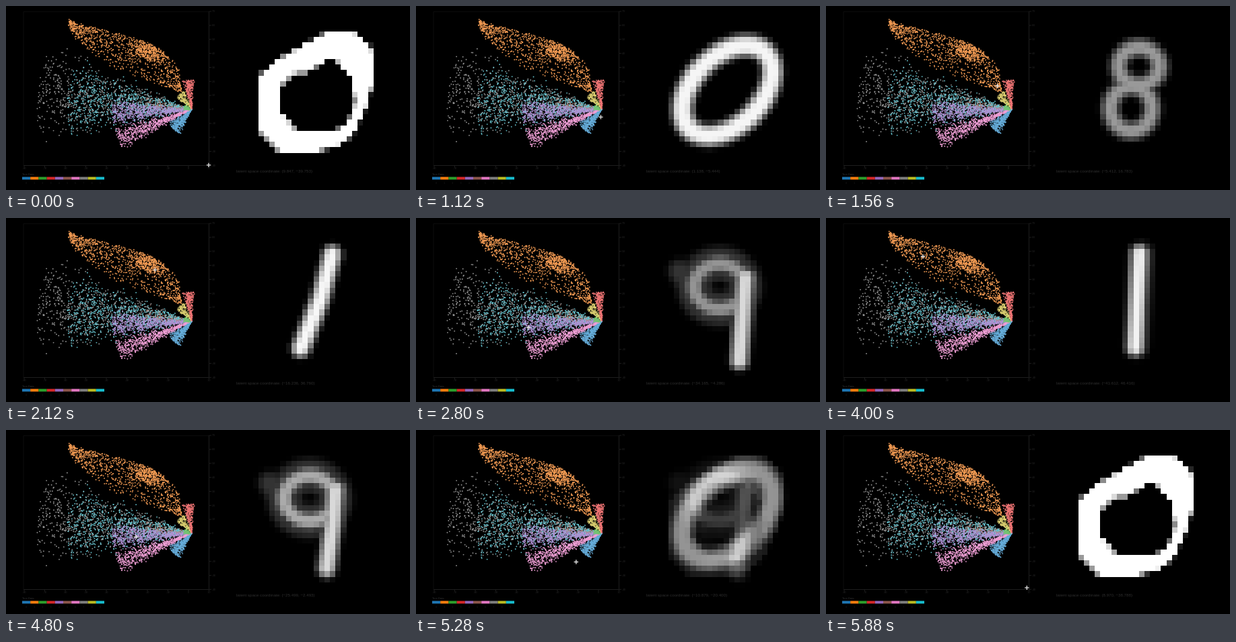
These frames come from a looping animation (600 by 274 pixels, 5920 ms). An HTML page with a canvas:

```html
<!DOCTYPE html>
<html lang="en">
<head>
<meta charset="utf-8">
<title>Latent space explorer</title>
<style>
  html, body { margin: 0; width: 100%; height: 100%; overflow: hidden; background: #000; }
  #stage { position: relative; width: 600px; height: 274px; overflow: hidden; background: #000; }
  #stage > * { position: absolute; left: 0; top: 0; }
  #stage > #digit { left: 342px; top: 5px; width: 229.3px; height: 229.8px; image-rendering: pixelated; }
  text { font-family: "Liberation Sans", Arial, sans-serif; }
</style>
</head>
<body>
<div id="stage">
  <canvas id="dots" width="600" height="274"></canvas>
  <canvas id="digit" width="28" height="28"></canvas>
  <svg width="600" height="274">
    <g id="axes" stroke="#1d1d1d" fill="none"></g>
    <g id="labels" fill="#2c2c2c" font-size="3.4"></g>
    <text x="24" y="252" font-size="4.2" fill="#303030">Test Data</text>
    <g id="legend"></g>
    <text id="caption" x="342" y="248" font-size="6.2" fill="#2e2e2e"></text>
    <path id="cursor" d="M-3.2 0H3.2M0 -3.2V3.2" stroke="#e0e0e0" stroke-width="1.4"/>
  </svg>
</div>
<script>
const LOOP = 5920, STEP = 40, N = 28;
const $ = id => document.getElementById(id);
const mix = (a, b, k) => a + (b - a) * k;
const clamp = v => Math.max(0, Math.min(1, v));
const smooth = k => k * k * (3 - 2 * k);
const toX = v => 271 + v * 3.05;
const toY = v => 154 - v * 2.085;

function add(parent, tag, attrs, text) {
  const el = document.createElementNS('http://www.w3.org/2000/svg', tag);
  for (const key in attrs) el.setAttribute(key, attrs[key]);
  if (text !== undefined) el.textContent = text;
  $(parent).append(el);
}

function drawChart() {
  add('axes', 'path', { d: 'M26 237.5V8.5H302', stroke: '#0c0c0c' });
  add('axes', 'path', { d: 'M26 237.5H301.5V8' });
  for (let v = -80; v <= 10; v += 10) {
    add('axes', 'path', { d: `M${toX(v)} 237v3` });
    add('labels', 'text', { x: toX(v), y: 243, 'text-anchor': 'middle' }, v);
  }
  for (let v = -40; v <= 70; v += 10) {
    add('axes', 'path', { d: `M302 ${toY(v)}h3` });
    add('labels', 'text', { x: 306, y: toY(v) + 1.2 }, v);
  }
  const colors = ['#1f77b4', '#ff7f0e', '#2ca02c', '#d62728', '#9467bd',
                  '#8c564b', '#e377c2', '#7f7f7f', '#bcbd22', '#17becf'];
  colors.forEach((fill, i) => {
    const x = 24 + i * 12.2;
    add('legend', 'rect', { x, y: 254.5, width: 12.2, height: 4, fill });
    add('legend', 'text', { x: x + 6, y: 265, 'font-size': 3, fill: '#222', 'text-anchor': 'middle' }, i);
  });
}

// Scatter plot: fans around one apex, plus a curved orange band
const APEX = [276, 154];
const fans = [
  // colour, count, middle angle, half angle, reach, bias
  ['#9c9c9c', 800, -6, 16, 230, .75],
  ['#6fd2de', 900, -5, 17, 186, 1],
  ['#b394d6', 650, 2, 9, 118, .8],
  ['#a9827a', 90, -10, 9, 70, 1],
  ['#f0a0d6', 700, 22, 8, 118, .9],
  ['#66acd8', 380, 47, 16, 40, .7],
  ['#d9cd70', 170, -52, 17, 29, .6],
  ['#f07676', 260, -82, 11, 44, .7],
  ['#72c672', 50, -15, 30, 12, .6]
];

let seed = 20177;
const rand = () => (seed = (seed * 16807) % 2147483647) / 2147483647;
const spread = () => rand() + rand() - 1;

const bezier = (a, b, c, d, u) =>
  mix(mix(mix(a, b, u), mix(b, c, u), u), mix(mix(b, c, u), mix(c, d, u), u), u);

function bandPoint(u, v) {
  const x = mix(bezier(94, 150, 262, 260, u), bezier(96, 125, 190, 256, u), v);
  const y = mix(bezier(21, 48, 40, 126, u), bezier(34, 85, 105, 126, u), v);
  return [x + 3 * spread(), y + 3 * spread()];
}

function drawDots() {
  const ctx = $('dots').getContext('2d');
  ctx.globalAlpha = .9;
  const dot = (x, y) => {
    ctx.beginPath();
    ctx.arc(x, y, .95, 0, 7);
    ctx.fill();
  };
  for (const [color, count, middle, half, reach, bias] of fans) {
    ctx.fillStyle = color;
    for (let i = 0; i < count; i++) {
      const turn = (middle + half * (spread() + rand() * 2 - 1) / 1.4) * Math.PI / 180;
      const r = reach * rand() ** bias;
      dot(APEX[0] - r * Math.cos(turn), APEX[1] + r * Math.sin(turn));
    }
  }
  ctx.fillStyle = '#f9a057';
  for (let i = 0; i < 900; i++) dot(...bandPoint(rand() ** 1.15, rand() ** 1.5));
  for (let i = 0; i < 300; i++) dot(...bandPoint(.6 + .16 * spread(), rand() * .4));
}

// Digit shapes on the 28 x 28 grid
const line = s => s.split(' ').map(p => p.split(',').map(Number));

function oval(cx, cy, rx, ry, tilt = 0) {
  const c = Math.cos(tilt), s = Math.sin(tilt);
  return Array.from({ length: 33 }, (_, i) => {
    const x = rx * Math.cos(i * Math.PI / 16), y = ry * Math.sin(i * Math.PI / 16);
    return [cx + x * c - y * s, cy + x * s + y * c];
  });
}

function segDist(px, py, [ax, ay], [bx, by]) {
  const dx = bx - ax, dy = by - ay;
  const k = clamp(((px - ax) * dx + (py - ay) * dy) / (dx * dx + dy * dy));
  return Math.hypot(px - ax - k * dx, py - ay - k * dy);
}

// Each stroke: points, half width, brightness
function ink(...strokes) {
  return Array.from({ length: N * N }, (_, i) => {
    const x = i % N + .5, y = Math.floor(i / N) + .5;
    return Math.max(...strokes.map(([pts, width, level]) => {
      const d = Math.min(...pts.slice(1).map((p, j) => segDist(x, y, pts[j], p)));
      return level * smooth(clamp((width + 1.2 - d) / 2.4));
    }));
  });
}

function solidZero() {
  const c = document.createElement('canvas');
  c.width = c.height = N;
  const ctx = c.getContext('2d');
  const outer = '16.6,4 21,4 24.4,6.4 25,9 25,13 23.5,18 21,23 18,25 13,26 8,26 4,22 4,12 8.5,8.4';
  const inner = '16.5,9 18,9 21,12.5 21.6,17 20,21 17.5,22 11,22 8.2,19 8,14 10.5,11.4 13,11.6';
  ctx.fillStyle = '#fff';
  ctx.fill(new Path2D(`M${outer}ZM${inner}Z`), 'evenodd');
  const data = ctx.getImageData(0, 0, N, N).data;
  return Array.from({ length: N * N }, (_, i) => clamp((data[i * 4 + 3] / 255 - .2) / .5));
}

const nine = (level, foot) => {
  const loop = oval(13.3, 11.8, 4.6, 4.1);
  return ink([loop, 3, .2], [line('6,9 8,12'), 1.9, .2], [loop, 1.4, level],
    [line(`18,10.2 17.6,16 ${foot}`), 1.5, .85]);
};

// Decoder: every anchor in data space has its own digit
const anchors = [
  [9.847, -39.753, solidZero()],
  [1.138, -5.444, ink([oval(14.7, 14.7, 9.75, 6.25, -Math.PI / 4), 1.75, .96])],
  [-7, 13, ink([oval(15, 10.3, 3.7, 3.4), 1.4, .6], [oval(13.6, 18, 3.8, 4), 1.4, .6])],
  [-16.236, 36.76, ink([line('17.4,6 15.2,14.3 11.7,23'), 1.5, .97])],
  [-34.165, -4.286, nine(.58, '16.9,25.2')],
  [-25.499, -2.493, nine(.67, '16.4,24.4')],
  [-41.612, 46.416, ink([line('15.4,6 14.5,22.6'), 2, .3], [line('15.1,5.8 14.3,22.9'), 1.4, .95])]
];

// Pointer path: time, x, y in data units
const track = [
  [0, 9.847, -39.753], [1120, 1.138, -5.444], [2120, -16.236, 36.76], [2800, -34.165, -4.286],
  [4000, -41.612, 46.416], [4800, -25.499, -2.493], [5880, 8.97, -38.788], [LOOP, 9.847, -39.753]
];

function slope(i, axis) {
  const a = track[Math.max(0, i - 1)], b = track[Math.min(track.length - 1, i + 1)];
  return (b[axis] - a[axis]) / (b[0] - a[0]);
}

function pointer(t, axis) {
  const i = track.findIndex((p, j) => t < track[j + 1][0]);
  const a = track[i], b = track[i + 1];
  const span = b[0] - a[0], k = (t - a[0]) / span, q = 1 - k;
  return mix(a[axis], b[axis], smooth(k)) +
    span * k * q * (q * slope(i, axis) - k * slope(i + 1, axis));
}

const screen = $('digit').getContext('2d');
const pixels = screen.createImageData(N, N);

// Blend the digits by inverse distance to their anchors
function drawDigit(x, y) {
  const weights = anchors.map(([ax, ay]) => 1 / (Math.hypot(x - ax, y - ay) + .01) ** 4);
  const total = weights.reduce((a, b) => a + b);
  for (let j = 0; j < N * N; j++) {
    const v = 255 * anchors.reduce((sum, a, i) => sum + a[2][j] * weights[i], 0) / total;
    pixels.data.set([v, v, v, 255], j * 4);
  }
  screen.putImageData(pixels, 0, 0);
}

const format = v => v.toFixed(3).replace('-', '\u2212');

function render(time) {
  const t = Math.floor((time % LOOP) / STEP) * STEP;
  const x = pointer(t, 1), y = pointer(t, 2);
  drawDigit(x, y);
  $('caption').textContent = `latent space coordinate: (${format(x)}, ${format(y)})`;
  $('cursor').setAttribute('transform', `translate(${toX(x)} ${toY(y)})`);
}

drawChart();
drawDots();
const start = performance.now();
function tick() {
  render(performance.now() - start);
  requestAnimationFrame(tick);
}
tick();
</script>
</body>
</html>
```
